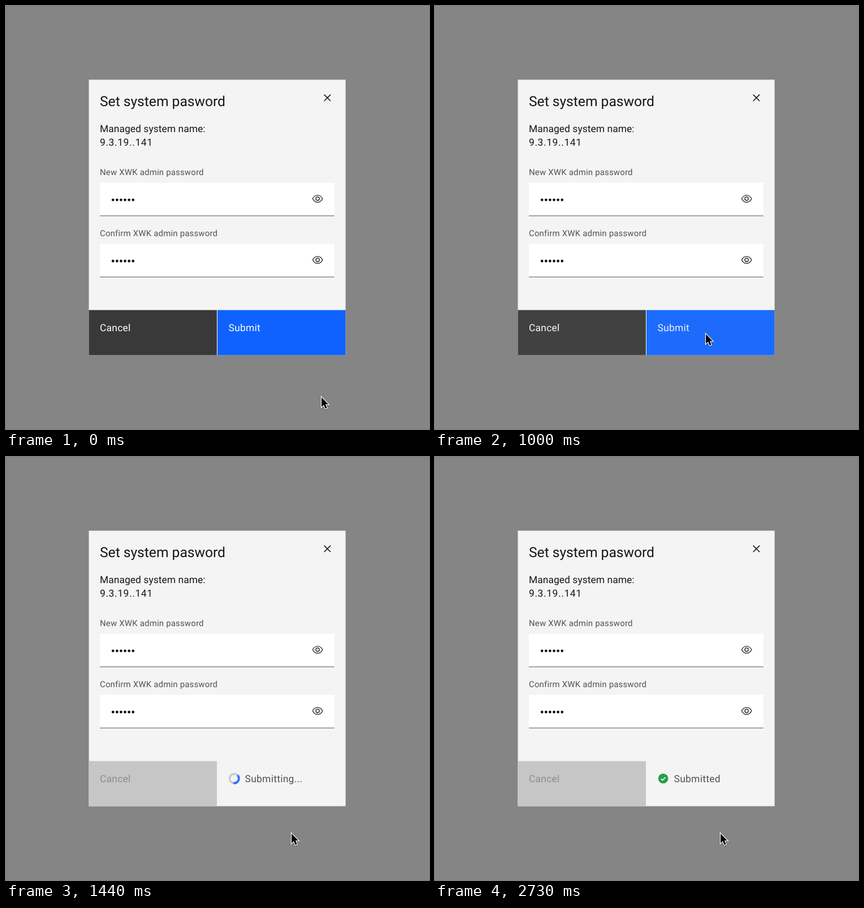
Recreate the animation shown at these times as an HTML page. Size 748 by 748 pixels, loop 2.76 s.

```html
<!DOCTYPE html>
<html lang="en">
<head>
<meta charset="utf-8">
<title>Set system password</title>
<style>
  html, body { margin: 0; width: 100%; height: 100%; overflow: hidden; background: #858585; }
  svg { display: block; width: 100%; height: 100%; }
  text { font: 17.4px Roboto, "Noto Sans", sans-serif; letter-spacing: .25px; fill: #161616; text-rendering: geometricPrecision; }
  .title { font-size: 24.6px; letter-spacing: 0; }
  .lead { letter-spacing: .07px; }
  .number { letter-spacing: .62px; }
  .label { font-size: 14.9px; letter-spacing: .22px; fill: #525252; }
  .light { fill: #fff; }
  .off { fill: #8d8d8d; }
  .status { fill: #525252; letter-spacing: .3px; }

  .idle, .busy, .wait, .done, .spin, .cursor { animation: 2760ms linear infinite; }
  .idle { animation-name: idle; }
  .busy { animation-name: busy; }
  .wait { animation-name: wait; }
  .done { animation-name: done; }
  .spin { animation-name: spin; }
  .cursor { animation-name: point; filter: drop-shadow(0 1px 1px rgba(0, 0, 0, .35)); }

  @keyframes idle {
    0% { opacity: 1; }
    36.01% { opacity: 1; animation-timing-function: ease-out; }
    43.26%, 100% { opacity: 0; }
  }
  @keyframes busy {
    0% { opacity: 0; }
    36.01% { opacity: 0; animation-timing-function: ease-out; }
    43.26%, 100% { opacity: 1; }
  }
  @keyframes wait {
    0% { opacity: 1; }
    74.93% { opacity: 1; animation-timing-function: ease-out; }
    78.26%, 100% { opacity: 0; }
  }
  @keyframes done {
    0% { opacity: 0; }
    74.93% { opacity: 0; animation-timing-function: ease-out; }
    78.26%, 100% { opacity: 1; }
  }
  @keyframes spin {
    from { transform: rotate(-225deg); }
    to { transform: rotate(810deg); }
  }
  @keyframes point {
    0% { transform: translate(558px, 692px); }
    1.45% { transform: translate(558px, 692px); animation-timing-function: ease-in-out; }
    15.22% { transform: translate(535px, 674px); }
    17.57% { transform: translate(535px, 674px); animation-timing-function: cubic-bezier(.35, .1, .9, .9); }
    22.46% { transform: translate(479px, 580.2px); }
    43.48% { transform: translate(479px, 580.2px); animation-timing-function: ease-out; }
    52.17%, 100% { transform: translate(505px, 666px); }
  }
</style>
</head>
<body>
<svg viewBox="0 0 748 748">
  <defs>
    <g id="field">
      <rect x="166" width="414.5" height="58.5" fill="#fff"/>
      <rect x="166" y="57.9" width="414.5" height="1.2" fill="#6f6f6f"/>
      <path d="M189.2 30.3h36" stroke="#161616" stroke-width="4.8" stroke-linecap="round" stroke-dasharray="0 7.1"/>
      <g transform="translate(541.1 18.4) scale(1.24)" fill="none" stroke="#161616">
        <path d="M1 8C2.1 5.2 5 3 8 3s5.9 2.2 7 5c-1.1 2.8-4 5-7 5S2.1 10.8 1 8z"/>
        <circle cx="8" cy="8" r="2.5"/>
      </g>
    </g>
  </defs>

  <rect width="748" height="748" fill="#858585"/>
  <rect x="146.5" y="130.3" width="454" height="487.2" fill="#f4f4f4"/>

  <text class="title" x="166" y="177">Set system pasword</text>
  <path d="M562.6 156.6l11.4 11.4m0-11.4l-11.4 11.4" stroke="#161616" stroke-width="1.6"/>
  <text class="lead" x="166" y="223">Managed system name:</text>
  <text class="number" x="166" y="247.3">9.3.19..141</text>
  <text class="label" x="166" y="299">New XWK admin password</text>
  <use href="#field" y="312.5"/>
  <text class="label" x="166" y="407.3">Confirm XWK admin password</text>
  <use href="#field" y="420.7"/>

  <rect x="146.5" y="537.7" width="226.4" height="79.8" fill="#c6c6c6"/>
  <text class="off" x="166" y="574.6">Cancel</text>
  <g class="idle">
    <rect x="146.5" y="537.7" width="226.4" height="79.8" fill="#393939"/>
    <text class="light" x="166" y="574.6">Cancel</text>
  </g>

  <rect class="idle" x="374" y="537.7" width="226.5" height="79.8" fill="#0f62fe"/>
  <text class="light idle" x="393.5" y="574.6">Submit</text>

  <g class="wait">
    <g class="busy" transform="translate(403.6 568.5)" fill="none" stroke-width="3.3">
      <circle r="8.2" stroke="#c6c6c6"/>
      <circle class="spin" r="8.2" stroke="#0f62fe" pathLength="360" stroke-dasharray="145 215"/>
    </g>
    <text class="status busy" x="422.5" y="574.6">Submitting...</text>
  </g>

  <g class="done">
    <circle cx="403.5" cy="568.5" r="8.8" fill="#24a148"/>
    <path d="M399.5 568.7l2.9 2.9 5.2-5.2" fill="none" stroke="#fff" stroke-width="1.5"/>
    <text class="status" x="422.5" y="574.6">Submitted</text>
  </g>

  <path class="cursor" d="M0 0V17L3.9 13.3 6.8 20 9.6 18.8 6.8 12.3H12Z" stroke="#fff" stroke-width="2.4" paint-order="stroke"/>
</svg>
</body>
</html>
```
